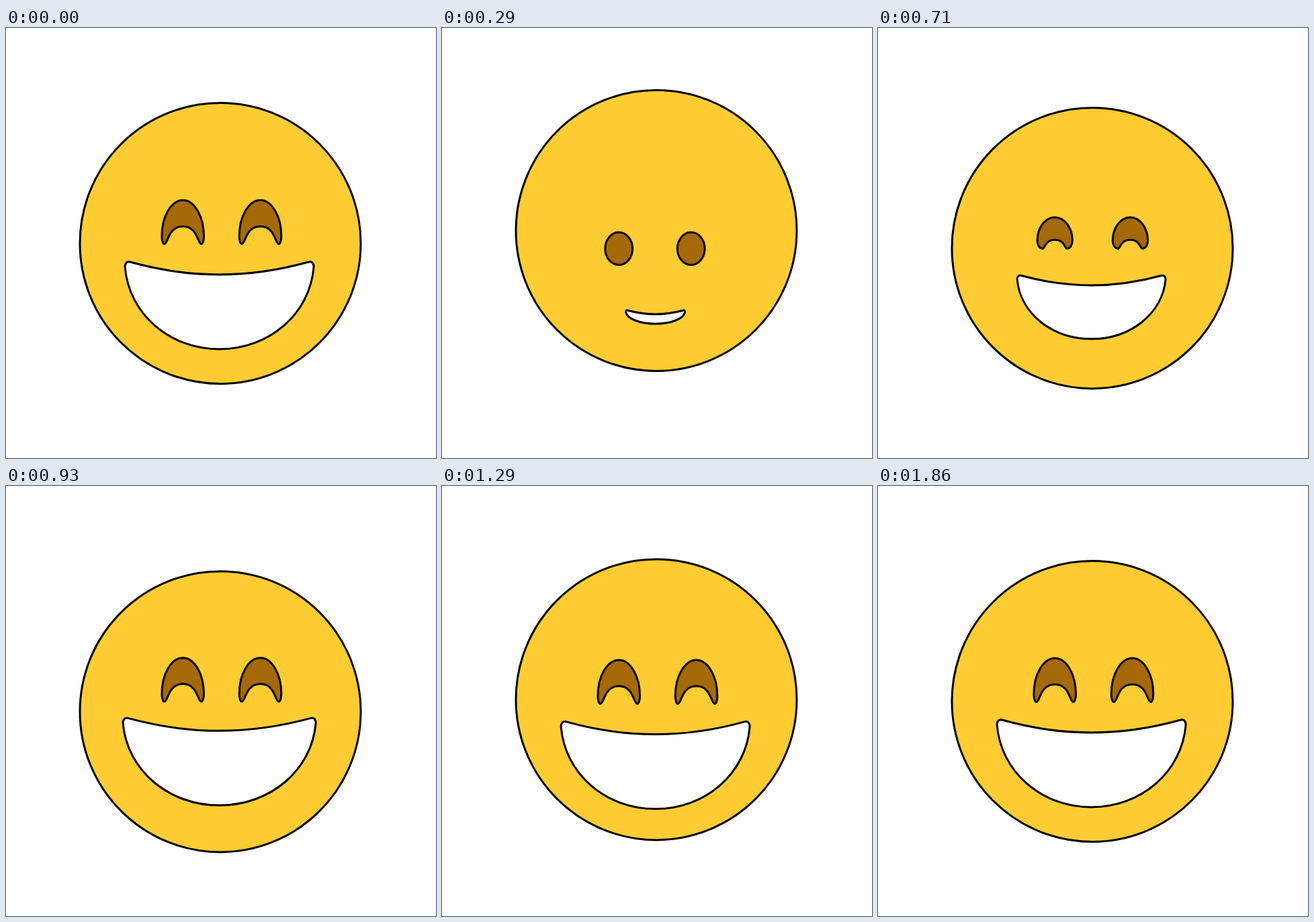
An HTML page for the animation above (2.21 s loop, 640x640 px).

```html
<!DOCTYPE html>
<html>
<head>
<meta charset="utf-8">
<style>
html, body { margin: 0; width: 100%; height: 100%; overflow: hidden; background: #fff; }
svg { display: block; width: 100%; height: 100%; }
</style>
</head>
<body>
<svg viewBox="0 0 640 640" stroke="#000" stroke-width="3" stroke-linejoin="round">
  <circle id="face" cx="319" r="209" fill="#ffcc33"/>
  <path id="left" fill="#a66908"/>
  <path id="right" fill="#a66908"/>
  <path id="mouth" fill="#fff"/>
</svg>
<script>
const LOOP = 2210, FPS = 14, LAST = 26;

// Half width w; heights of the corner, lip middle and bottom; corner radius r.
const GRIN = { w: 140.5, corner: 347.5, lip: 367, bottom: 478, r: 8 };
const SMILE = { w: 44, corner: 420, lip: 426, bottom: 440.3, r: 2.7 };

// Half width w, half distance of the feet, heights, and the gap between the eyes.
const EYES = [
  { w: 31.3, feet: 27.5, top: 256.3, side: 310, foot: 321.5, inner: 295.2, gap: 115.3 },
  { w: 21, feet: 9, top: 308, side: 324, foot: 336, inner: 336, gap: 109.2 },
  { w: 20.4, feet: 0, top: 304, side: 328.4, foot: 352.6, inner: 352.6, gap: 107.5 },
];

const ease = u => (1 - Math.cos(Math.PI * u)) / 2;
const lerp = (a, b, u) => a + (b - a) * u;
const mix = (a, b, u) =>
  Object.fromEntries(Object.keys(a).map(k => [k, lerp(a[k], b[k], u)]));

// Eased swings between [step, value] turning points.
function swing(s, ...keys) {
  const i = keys.findIndex(k => k[0] > s);
  if (i < 1) return keys.at(i)[1];
  const [s0, v0] = keys[i - 1], [s1, v1] = keys[i];
  return lerp(v0, v1, ease((s - s0) / (s1 - s0)));
}

// Mirrors the right half, given from top to bottom, around cx.
function outline(half, cx, dy) {
  const place = dir => ([x, y]) => `${cx + dir * x} ${y + dy}`;
  const right = half.map(place(1)), left = half.map(place(-1)).reverse();
  return `M${right[0]}C${right.slice(1).join(' ')} ${left.slice(1).join(' ')}Z`;
}

function mouthHalf({ w, corner, lip, bottom, r }) {
  const end = corner + r;
  return [[0, lip], [w * .34, lip], [w * .65, lerp(lip, corner, .37)], [w - r, corner + r * .1],
    [w - r * .4, corner - r * .1], [w, corner + r * .3], [w, end],
    [w * .96, lerp(end, bottom, .57)], [w * .53, bottom], [0, bottom]];
}

function eyeHalf({ w, feet, top, side, foot, inner }) {
  const bend = .55;
  return [[0, top], [w * bend, top], [w, lerp(side, top, bend)], [w, side],
    [w, lerp(side, foot, bend)], [lerp(feet, w, bend), foot], [feet, foot],
    [feet * .8, foot], [feet * .8, inner], [0, inner]];
}

const el = id => document.getElementById(id);
const setPath = (id, ...shape) => el(id).setAttribute('d', outline(...shape));

function draw(s) {
  el('face').setAttribute('cy',
    swing(s, [0, 320.5], [5, 299.5], [6, 299.5], [12, 337], [18.5, 317.6], [26, 320.5]));

  const squint = swing(s, [0, 0], [4, 2], [6, 2], [8, 1], [12, 0]);
  const i = Math.min(Math.floor(squint), 1);
  const eye = mix(EYES[i], EYES[i + 1], squint - i);
  const eyeY = swing(s, [8, 0], [12, -.8], [18.5, 2.7], [23, 0]);
  setPath('left', eyeHalf(eye), 263.2, eyeY);
  setPath('right', eyeHalf(eye), 263.2 + eye.gap, eyeY);

  const calm = swing(s, [0, 0], [4, 1], [6, 1], [12.5, 0]);
  const mouth = mix(GRIN, SMILE, calm);
  mouth.w += swing(s, [8, 0], [13, 3], [17, 0]);
  const mouthY = swing(s, [5, 0], [8, -3], [12, -3], [18.5, 2.7], [23, 0]);
  setPath('mouth', mouthHalf(mouth), 317.6, mouthY);
}

// Steps start at multiples of 1/14 s, rounded to 10 ms.
function stepAt(t) {
  let s = Math.min(LAST, Math.floor(t * FPS / 1000) + 1);
  while (Math.round(s * 100 / FPS) * 10 > t) s--;
  return s;
}

function tick() {
  draw(stepAt(performance.now() % LOOP));
  requestAnimationFrame(tick);
}
tick();
</script>
</body>
</html>
```
